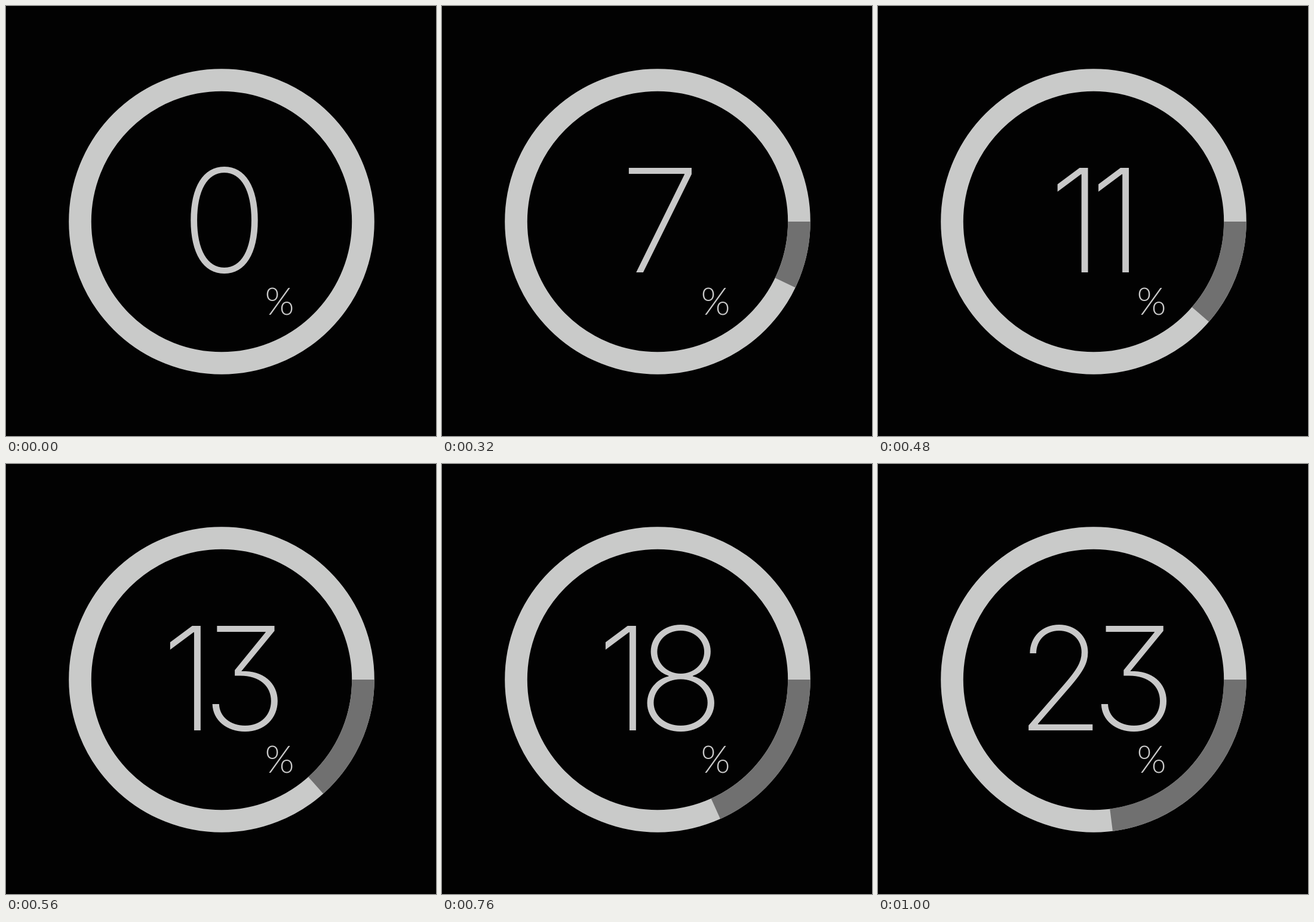
An HTML page for the animation above (4.08 s loop, 720 px wide and 720 px high).

```html
<!DOCTYPE html>
<html lang="en">
<head>
<meta charset="utf-8">
<title>Progress ring</title>
<style>
  html, body { margin: 0; width: 100%; height: 100%; overflow: hidden; background: #020202; }
  svg { display: block; width: 100%; height: 100%; }
  circle { fill: none; stroke-width: 37.6; }
  .track { stroke: #c9cac9; }
  .progress { stroke: #707070; }
  text { fill: #c9c9c9; text-anchor: middle; }
  .count {
    font: 200 240px Inter, sans-serif;
    font-feature-settings: "cv09"; /* flat-top three */
    letter-spacing: -.095em;
  }
  .unit { font: 300 63px Lato, sans-serif; }
</style>
</head>
<body>
<svg viewBox="0 0 720 720">
  <circle class="track" cx="361" cy="361" r="237"/>
  <circle class="progress" cx="361" cy="361" r="237" pathLength="100" stroke-dasharray="0 200"/>
  <text class="count" x="354" y="446">0</text>
  <text class="unit" x="458" y="516.5">%</text>
</svg>
<script>
  const LOOP = 4080, STEP = 40, GOAL = 23;
  const progress = document.querySelector('.progress');
  const count = document.querySelector('.count');

  // Easing knots: [step, percent, slope]
  const knots = [
    [1, 0, .2], [4, 2.48, 1.12], [8, 7.12, 1.12], [12, 11.39, 1.03],
    [16, 15.39, .98], [21, 20.1, .9], [25, GOAL, .4]
  ];

  function percentAt(step) {
    if (step <= 1) return 0;
    if (step >= 25) return GOAL;
    const i = knots.findIndex(k => k[0] > step);
    const [x0, y0, m0] = knots[i - 1], [x1, y1, m1] = knots[i];
    const h = x1 - x0, u = (step - x0) / h, v = 1 - u;
    return v * v * ((1 + 2 * u) * y0 + u * h * m0)
         + u * u * ((1 + 2 * v) * y1 - v * h * m1);
  }

  function draw(now) {
    const step = Math.floor((now % LOOP) / STEP);
    const value = Math.max(0, Math.min(step - 1, GOAL));
    progress.setAttribute('stroke-dasharray', `${percentAt(step)} 200`);
    if (count.textContent !== String(value)) count.textContent = value;
    requestAnimationFrame(draw);
  }
  requestAnimationFrame(draw);
</script>
</body>
</html>
```
